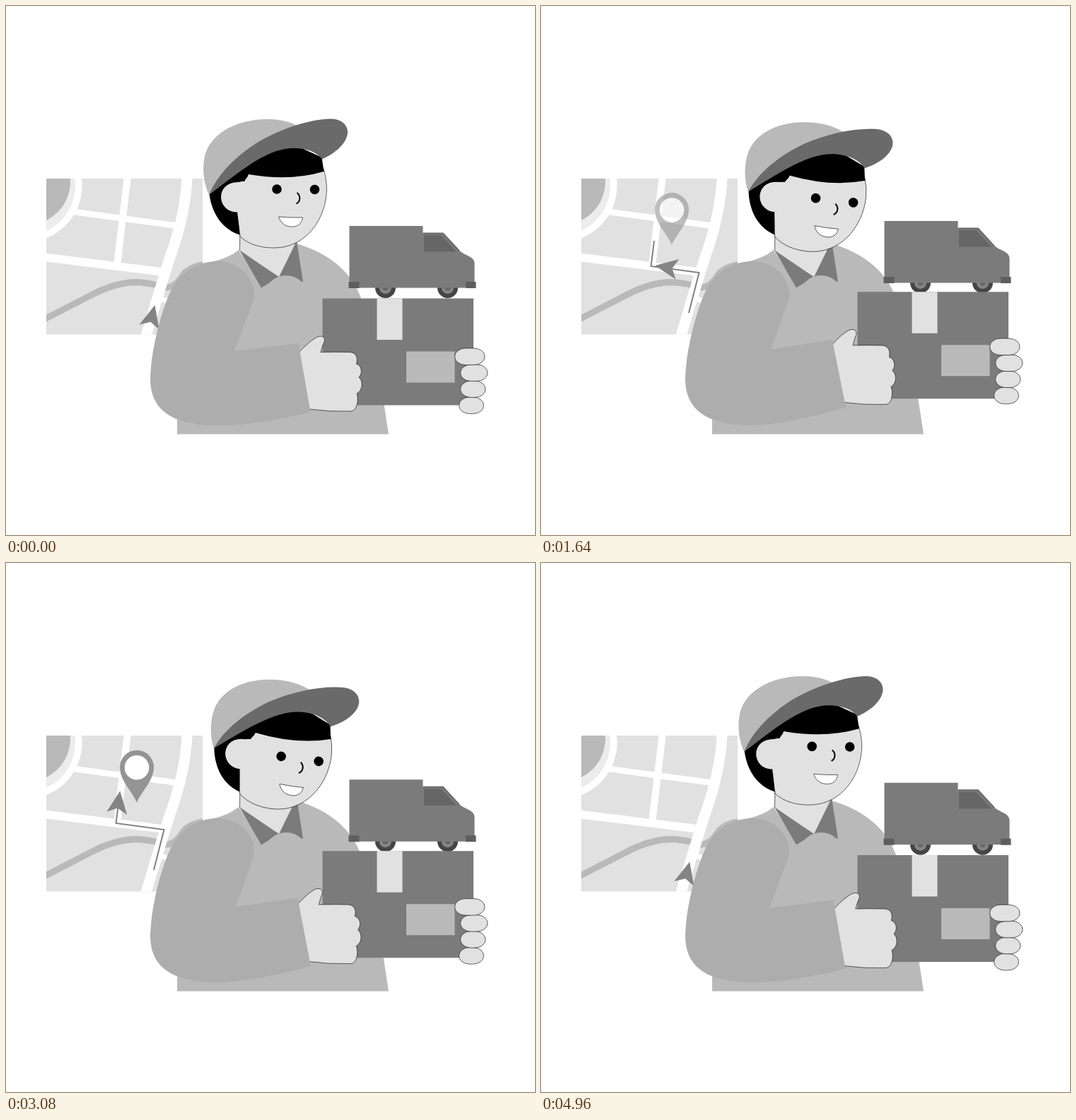
An HTML page for the animation above (5000 ms loop, 748 by 748 pixels).

```html
<!DOCTYPE html>
<html lang="en">
<head>
<meta charset="utf-8">
<title>Courier with parcel</title>
<style>
html, body { margin: 0; width: 100%; height: 100%; overflow: hidden; background: #fff; }
svg { display: block; width: 100vw; height: 100vh; }
.line { stroke: #000; stroke-width: .6; }
.skin { fill: #e1e1e1; }
.coat { fill: #b9b9b9; }
.road { fill: none; stroke: #fff; }
</style>
</head>
<body>
<svg viewBox="0 0 748 748">
  <clipPath id="frame"><rect x="57" y="244" width="221" height="220.5"/></clipPath>

  <!-- map -->
  <g clip-path="url(#frame)">
    <rect class="skin" x="57" y="244" width="221" height="221"/>
    <circle cx="28" cy="254" r="79.6" fill="#fff"/>
    <circle cx="28" cy="254" r="70" fill="#ececec"/>
    <circle class="coat" cx="29" cy="248" r="62"/>
    <path d="M53 443.500L120 409Q160 388 192 391Q212 393 222 398Q238 400 249 382Q258 368 284 365" fill="none" stroke="#b9b9b9" stroke-width="9"/>
    <path class="road" d="M172 240L157.500 363" stroke-width="10"/>
    <path class="road" d="M92 290.500L240 310.500" stroke-width="8.500"/>
    <path class="road" d="M52 355L226 376.500" stroke-width="11.500"/>
    <path class="road" d="M256 240C255 285 243 325 231 358C221 390 210 425 197 470" stroke-width="15"/>
    <path class="road" d="M214 412L236 420" stroke-width="7"/>
  </g>
  <path id="route" pathLength="1" d="M209 434L223.500 377L155.500 368L160 332" fill="none" stroke="#808080" stroke-width="2"/>
  <path id="track" d="M206.500 438.500L222 377L155 366L159 338" fill="none"/>
  <g id="pin">
    <path d="M185 337C179 322 161 306 161 287A24 24 0 0 1 209 287C209 306 191 322 185 337Z" fill="#949494"/>
    <circle cx="185" cy="287.500" r="17.300" fill="#fff"/>
  </g>
  <path id="arrow" d="M0-16L14.500 16L0 8.500L-14.500 16Z" fill="#848484"/>

  <!-- torso -->
  <path class="coat" d="M242 605.500V570L290 362Q314 357 329 345L361 396L386 384L411 336Q481 357 502 413Q520 470 534 560L541 605.500Z"/>
  <path class="skin" d="M330.500 300V346L361 380L386 383L414 330Z"/>
  <path class="line" d="M331 312L330.500 346" fill="none"/>
  <path d="M330 345Q356 363 386 383L361 398.500Z" fill="#7b7b7b"/>
  <path d="M386 383L411 332L420 390Z" fill="#7b7b7b"/>
  <circle class="coat" cx="396" cy="412" r="31"/>

  <!-- head -->
  <g id="head">
    <path d="M287 262C290 294 307 317 332 324L345 240L300 245Z"/>
    <path class="skin line" d="M327 270L331 326C344 338 362 342 379 342C425 342 454 300 453.500 256Q453 243 449 230L345 230Z"/>
    <path class="skin" d="M325 248H345V300L331 323L327 291Z"/>
    <circle class="skin" cx="325.500" cy="270" r="21.500"/>
    <g id="features">
      <circle cx="383" cy="259" r="6.800"/>
      <circle cx="436.500" cy="259.500" r="6.800"/>
      <g id="lids" class="skin">
        <ellipse cx="383" cy="259" rx="6.600" ry="6.200"/>
        <ellipse cx="436.500" cy="259.500" rx="6.600" ry="6.200"/>
      </g>
      <path d="M411.500 264C416.500 268 417 276 410.500 279.500" fill="none" stroke="#000" stroke-width="2"/>
      <path class="line" d="M385.500 298Q402 299.500 419.500 299C418 309 411 312.500 404 312C394 312 388 306 385.500 298Z" fill="#fff"/>
    </g>
    <path d="M289 263L345 210L405 195L446.500 214L449.500 234Q402 248 343 238Q340 248 329 249Q312 249 305 262L296 275Z"/>
    <path class="coat" d="M287 267C279 250 278 232 280 218C284 184 322 160 370 160Q394 160 412 169L370 190Z"/>
    <path d="M287 267C299 238 325 212 357 192C390 173 430 160 460 159.500C475 160 484 169 483 180C481 196 464 209 447 216.500C439 206 424 201 407 201C368 201 330 235 287 267Z" fill="#6a6a6a"/>
  </g>

  <!-- van -->
  <g id="van">
    <g id="wheels"></g>
    <path d="M485.500 311H589.500V321H618L641 346Q646 350 652 352.500Q662.500 357 662.500 364V398.500H485.500Z" fill="#7b7b7b"/>
    <path d="M590 321.500H618L641 346.500" fill="none" stroke="#6a6a6a" stroke-width="2"/>
    <path d="M591 324H615.500L637 347.500H591Z" fill="#666"/>
    <path d="M484.500 390H499.500V399H484.500ZM650 390H664.500V399H650Z" fill="#5e5e5e"/>
  </g>

  <!-- parcel -->
  <g id="box">
    <rect x="447.500" y="413.500" width="213.500" height="151" fill="#7b7b7b"/>
    <rect class="skin" x="524.500" y="413.500" width="36" height="58.500"/>
    <rect class="coat" x="566" y="488.500" width="68.500" height="44"/>
  </g>
  <g id="fingers" class="skin line"></g>
  <path id="hand" class="skin line" d="M414 490Q429 474 440 468C448 465 452 469 450 475Q447 481 445 489.500Q468 489 486 489.500C495 490 498 497 495.500 506C504 509 504 520 499 525C505 530 505 543 496 548C499 555 497 573 487 573Q458 574 428 570Z"/>
  <path id="arm" fill="#adadad"/>
</svg>
<script>
const LOOP = 5000, HALF = LOOP / 2, PEAK = 1200;
const el = id => document.getElementById(id);
const set = (id, name, value) => el(id).setAttribute(name, value);
const shift = (id, y) => set(id, 'transform', `translate(0 ${y})`);
const mix = (a, b, k) => a + (b - a) * k;
const smooth = k => k * k * (3 - 2 * k);
// 0 before a, 1 after b, linear between
const ramp = (t, a, b) => Math.min(1, Math.max(0, (t - a) / (b - a)));
const pulse = (t, a, b, c, d) => ramp(t, a, b) - ramp(t, c, d);

el('wheels').innerHTML = [536.5, 624.5].map(x =>
  [[14.5, '#454545'], [8.5, '#858585'], [4, '#666']].map(([r, fill]) =>
    `<circle cx="${x}" cy="398.5" r="${r}" fill="${fill}"/>`).join('')).join('');

// right edge and width, from the lowest finger up
el('fingers').innerHTML = [[675.5, 35], [678, 35.5], [681, 38.5], [677, 42.5]].map(([right, w], i) =>
  `<rect x="${right - w}" y="${553 - 23 * i}" width="${w}" height="23.5" rx="15" ry="11.75"/>`).join('');

// upper arm stays, the cuff and elbow rise by k
const armPath = k => `M300 361C325 361 351 380 351 408Q351 414 348 421
  L${323 + 4 * k} ${488 - 4 * k}L${413.5 - 2.5 * k} ${477 - 8 * k}L${430.5 + k} ${574 - 9 * k}
  C390 ${584 - 8 * k} 340 ${594 - 2 * k} 295 593
  C240 592 204 575 204 527C205 488 218 437 231 407C243 380 266 361 300 361Z`;

const track = el('track'), trackEnd = track.getTotalLength();

function arrowAt(s) {
  const p = track.getPointAtLength(s);
  const a = track.getPointAtLength(Math.max(0, s - 5));
  const b = track.getPointAtLength(Math.min(trackEnd, s + 6));
  return [p.x, p.y, Math.atan2(b.x - a.x, a.y - b.y) * 180 / Math.PI];
}

function drawArrow(t) {
  const u = ramp(t, 0, 3000), home = smooth(ramp(t, 4000, LOOP));
  const there = arrowAt(trackEnd * (u + u * u * (1 - u)));
  const [x, y, r] = arrowAt(0).map((v, i) => mix(there[i], v, home));
  set('arrow', 'transform', `translate(${x} ${y}) rotate(${r})`);
}

function draw(t) {
  const near = Math.min(t, LOOP - t);
  const k = ramp(near, 0, PEAK) - ramp(near, PEAK, HALF);
  shift('box', -14 * k);
  shift('van', -10.5 * k);
  shift('fingers', -21 * k);
  set('hand', 'transform', `translate(0 ${573 - 14.5 * k}) skewX(${4 * k}) translate(0 -573)`);
  set('arm', 'd', armPath(k));

  const swing = near / HALF, turn = swing * (1.3 - 0.3 * swing);
  set('head', 'transform', `rotate(${8.5 * turn} 332 320)`);
  shift('features', 9.5 * turn);
  shift('lids', 16 - 11 * pulse(t, 2040, 2120, 2200, 2280));

  drawArrow(t);
  set('route', 'stroke-dasharray', `${pulse(t, 0, 1250, 4500, 4950)} 2`);
  set('pin', 'opacity', pulse(t, 1400, 1800, 4520, 4900));
  shift('pin', 3.2 * (1 - k));
}

function tick() {
  draw(performance.now() % LOOP);
  requestAnimationFrame(tick);
}
tick();
</script>
</body>
</html>
```
